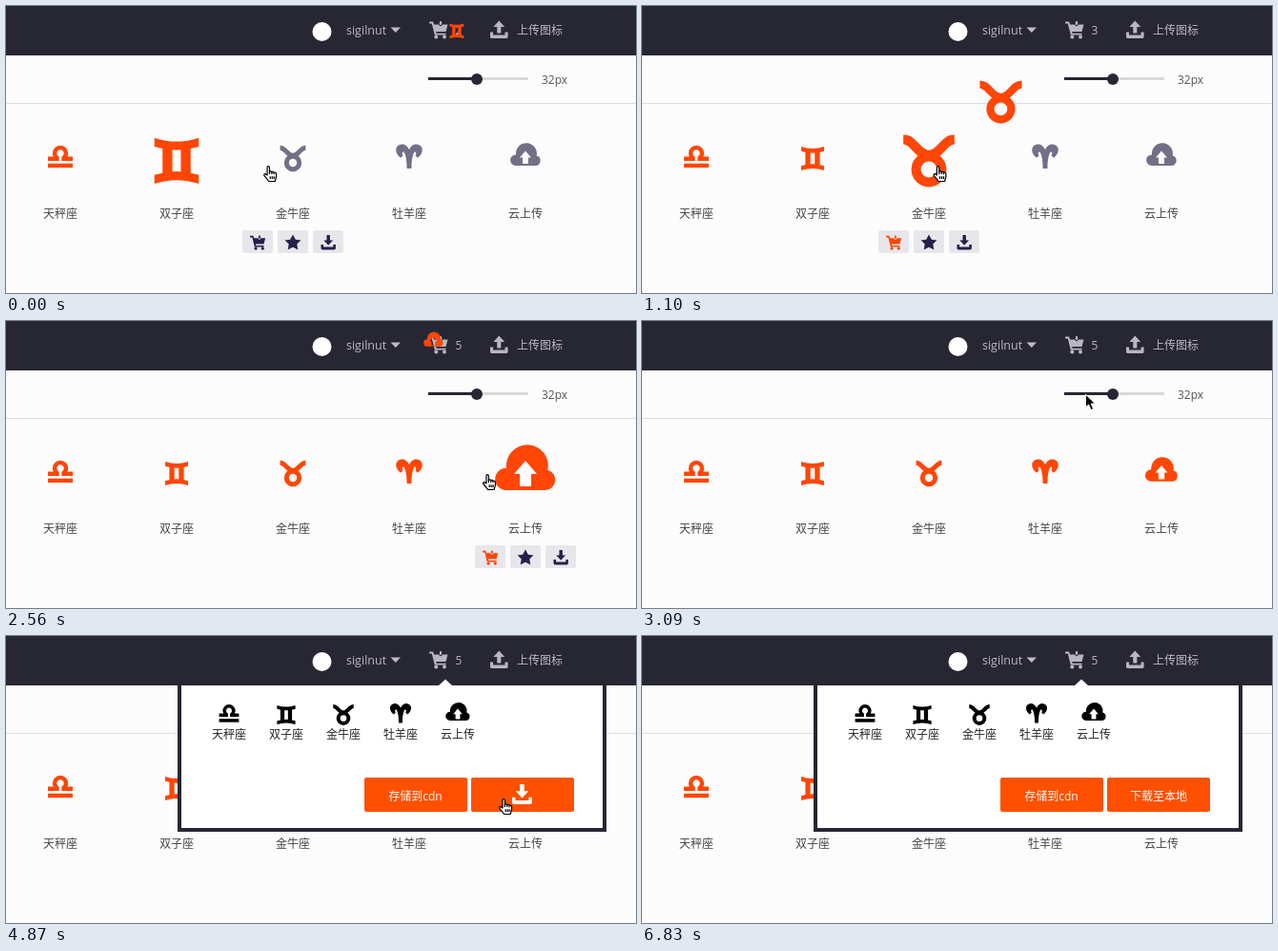
Animation of 661x302 px, one loop 7.22 s. Source, as an HTML page:

```html
<!DOCTYPE html>
<html lang="zh">
<head>
<meta charset="utf-8">
<title>图标购物车</title>
<style>
html, body { margin: 0; width: 100%; height: 100%; overflow: hidden; background: #fcfcfc; }
svg { display: block; width: 661px; height: 302px; }
text { font: 12px "Open Sans", "Noto Sans", "Noto Sans CJK SC", "Noto Sans CJK", sans-serif; }
.mid { text-anchor: middle; }
</style>
</head>
<body>
<svg id="stage" viewBox="0 0 661 302">
  <defs>
    <g id="libra">
      <path d="M-13 2.8H-3.6V1.8A6 6 0 1 1 3.6 1.8V2.8H13" fill="none" stroke="currentColor" stroke-width="4.5"/>
      <path d="M-13 7.7H13V12.1H-13Z" fill="currentColor"/>
    </g>
    <g id="gemini" fill="currentColor">
      <path d="M-12 -10Q0 -6 12 -10V-5.2Q0 -1.4 -12 -5.2Z"/>
      <path d="M-12 15Q0 11 12 15V10.2Q0 6.4 -12 10.2Z"/>
      <path d="M-7.6 -6H-2.3V11H-7.6ZM2.3 -6H7.6V11H2.3Z"/>
    </g>
    <g id="taurus" fill="none" stroke="currentColor" stroke-width="5">
      <circle cy="7" r="6.7"/>
      <path d="M-13.4 -8.7C-7.4 -8.7 -6.6 -1 0 -.5C6.6 -1 7.4 -8.7 13.4 -8.7"/>
    </g>
    <g id="aries" fill="currentColor">
      <path id="horn" d="M.1 13H-2.4C-2.5 6 -3 0 -5.3 -4.3C-7.3 -5.2 -8 -2.6 -6.5 -.6L-9 1.8C-13 -1 -15 -6 -13 -9.4C-10.6 -13.8 -3 -14.4 .1 -6.5Z"/>
      <use href="#horn" transform="scale(-1 1)"/>
    </g>
    <path id="cloud" fill="currentColor" fill-rule="evenodd" d="M-10.2 10A5.8 5.8 0 0 1 -10 -1.6A11 11 0 1 1 11.7 -.6A5.4 5.4 0 0 1 10.4 10ZM0 -5.5L6 1.5H3V8H-3V1.5H-6Z"/>
    <g id="cart" fill="currentColor">
      <path d="M0 1H4.2L5 4H9.6L12 6L14.4 4H19.5L17.5 11.5H7.2L7.6 13.2H17.5V15H5.8L2.8 3H0Z"/>
      <path d="M11 .6H13V3H14L12 4.8L10 3H11Z"/>
      <circle cx="7.3" cy="17" r="2"/><circle cx="16" cy="17" r="2"/>
    </g>
    <path id="tray" fill="currentColor" d="M0 13H3.3V16.2H16.7V13H20V18Q20 20 18 20H2Q0 20 0 18Z"/>
    <g id="down" fill="currentColor"><use href="#tray"/><path d="M7.8 0H12.2V7H16.4L10 13.8L3.6 7H7.8Z"/></g>
    <g id="up" fill="currentColor"><use href="#tray"/><path d="M7.8 14H12.2V7H16.4L10 0L3.6 7H7.8Z"/></g>
    <path id="star" fill="currentColor" d="M0 -8.5L2.8 -3.2L8.4 -2.6L4.3 1.5L5.3 7.4L0 4.7L-5.3 7.4L-4.3 1.5L-8.4 -2.6L-2.8 -3.2Z"/>
    <path id="arrow" fill="#000" stroke="#fff" stroke-width="1" d="M.5 .5V14L3.6 11.2L6 16.8L8.6 15.7L6.2 10.2H10.5Z"/>
    <g id="hand" stroke="#000" stroke-width="1.2" stroke-linejoin="round">
      <path fill="#fff" d="M4 10V2Q4 .6 5.2 .6T6.4 2V6.3Q7.6 5.2 8.7 6.6Q10 5.8 11 7.2Q13.5 6.8 13.5 9V11.5L12.2 16.5H5.6Q3.6 13.5 .8 10.3Q.4 8.4 2.2 8.7Z"/>
      <path fill="none" d="M6.4 6V9M8.8 6.8V9M11 7.4V9.3M7.2 11.3V14M9.2 11.3V14M11.1 11.3V14"/>
    </g>
  </defs>

  <path fill="#fcfcfc" d="M0 0H661V302H0Z"/>
  <path fill="#ddd" d="M0 102H661V103H0Z"/>
  <path fill="#272633" d="M0 0H661V52H0Z"/>
  <circle cx="331.5" cy="27" r="10" fill="#fff"/>
  <g fill="#bcbbc6" color="#b7b6c1">
    <text x="357" y="29.5" style="font-size:12.5px">sigilnut</text>
    <path d="M403.5 22.5H414L408.8 28Z"/>
    <use href="#cart" transform="translate(444 15.5)"/>
    <text id="count" x="471.5" y="30"></text>
    <use href="#up" transform="translate(508 15.5) scale(.93)"/>
    <text x="536" y="30">上传图标</text>
  </g>
  <path fill="#d9d9d9" d="M494 75H548V78H494Z"/>
  <path fill="#272633" d="M443 75H494V78H443Z"/>
  <circle cx="494" cy="77" r="6" fill="#272633"/>
  <text x="562" y="81.5" fill="#555">32px</text>

  <g id="items"></g>
  <g id="tools" color="#23214a">
    <g fill="#e7e7eb">
      <rect x="-53" y="236" width="32" height="24" rx="2"/>
      <rect x="-16" y="236" width="32" height="24" rx="2"/>
      <rect x="21" y="236" width="32" height="24" rx="2"/>
    </g>
    <use id="toolCart" href="#cart" transform="translate(-45 241) scale(.83)"/>
    <use href="#star" y="249"/>
    <use href="#down" transform="translate(29.5 241) scale(.77)"/>
  </g>
  <g id="flights" color="#ff4606"></g>

  <g id="popup">
    <path fill="#272633" d="M180 51H630V206H180Z"/>
    <path fill="#fff" d="M184 52H454L461 45.5L468 52H626V202H184Z"/>
    <g id="picked" color="#000"></g>
    <g fill="#ff5000">
      <rect x="376" y="149" width="108" height="36" rx="2"/>
      <rect x="488" y="149" width="108" height="36" rx="2"/>
    </g>
    <g fill="#fff" color="#fff">
      <text class="mid" x="429.5" y="172.5">存储到cdn</text>
      <text class="mid" id="saveText" x="542" y="172.5">下载至本地</text>
      <use id="saveIcon" href="#down" transform="translate(531 156) scale(1.05)"/>
    </g>
  </g>
  <use id="cursor"/>
</svg>
<script>
const LOOP = 7220, FLIGHT = 1000, ZOOM = 400;
const $ = id => document.getElementById(id);

// on/off: pointer over the item; click: added to the cart; end: landing point
const items = [
  { id: 'libra', name: '天秤座', on: -9e3, off: -9e3, click: -9e3 },
  { id: 'gemini', name: '双子座', on: -2000, off: -30, click: -830, end: [478, 22.5] },
  { id: 'taurus', name: '金牛座', on: 20, off: 1180, click: 815, end: [456.5, 32] },
  { id: 'aries', name: '牡羊座', on: 1180, off: 1730, click: 1315, end: [450, 22] },
  { id: 'cloud', name: '云上传', on: 1730, off: 2820, click: 1760, end: [446, 17] }
];

// time, left, top
const path = [
  [0, 270, 168], [450, 305, 170], [1100, 305, 168], [1200, 345, 166], [1300, 412, 164],
  [1680, 432, 164], [1800, 515, 166], [2050, 522, 166], [2400, 508, 164], [2560, 500, 161],
  [2900, 484, 150], [3060, 470, 90], [3210, 446, 26], [3690, 446, 26], [3810, 458, 40],
  [4390, 515, 177], [4570, 515, 174], [4810, 516, 172], [4870, 517, 171],
  [6430, 517, 171], [6830, 640, 305], [LOOP, 640, 305]
];

const clamp = v => Math.max(0, Math.min(1, v));
const mix = (a, b, p) => a + (b - a) * p;
const bez = (a, b, u) => 3 * a * u * (1 - u) ** 2 + 3 * b * u * u * (1 - u) + u ** 3;

// cubic-bezier(.25, .1, .25, 1)
function ease(v) {
  const x = clamp(v);
  let lo = 0, hi = 1;
  for (let i = 0; i < 18; i++) {
    const m = (lo + hi) / 2;
    if (bez(.25, .25, m) < x) lo = m; else hi = m;
  }
  return x === 0 || x === 1 ? x : bez(.1, 1, lo);
}

function add(parent, tag, attrs, text) {
  const el = document.createElementNS('http://www.w3.org/2000/svg', tag);
  for (const k in attrs) el.setAttribute(k, attrs[k]);
  if (text) el.textContent = text;
  return $(parent).appendChild(el);
}

const place = (el, x, y, s = 1) => el.setAttribute('transform', `translate(${x} ${y}) scale(${s})`);
const show = (el, on) => el.setAttribute('visibility', on ? 'visible' : 'hidden');

items.forEach((it, i) => {
  it.x = 57 + 122 * i;
  const href = '#' + it.id, px = 234 + 60 * i;
  it.icon = add('items', 'use', { href });
  add('items', 'text', { x: it.x, y: 222.5, class: 'mid', fill: '#444' }, it.name);
  it.flyer = add('flights', 'use', { href });
  place(add('picked', 'use', { href }), px, 81, .8);
  add('picked', 'text', { x: px, y: 107.5, class: 'mid', fill: '#222' }, it.name);
});

function pointer(t) {
  const i = path.findIndex(k => k[0] > t), a = path[i - 1], b = path[i];
  const p = (t - a[0]) / (b[0] - a[0]);
  return [mix(a[1], b[1], p), mix(a[2], b[2], p)];
}

function draw(t) {
  for (const it of items) {
    const zoom = 1 + ease((t - it.on) / ZOOM) - ease((t - it.off) / ZOOM);
    place(it.icon, it.x, 158, zoom);
    it.icon.setAttribute('color', t >= it.click ? '#ff4606' : '#717086');
    const flying = t >= it.click && t < it.click + FLIGHT;
    show(it.flyer, flying);
    if (flying) {
      const p = ease((t - it.click) / FLIGHT);
      place(it.flyer, mix(it.x, it.end[0], p), mix(158, it.end[1], p), 2 - 1.42 * p ** 1.9);
    }
  }
  $('count').textContent = items.filter(it => t >= it.click).length;

  // the first hover is already under way when the loop starts
  const over = items.find(it => t >= it.on - 20 && t < it.off);
  $('tools').setAttribute('display', over ? 'inline' : 'none');
  if (over) {
    place($('tools'), over.x, 0);
    $('toolCart').setAttribute('color', t >= over.click ? '#ff4606' : '#23214a');
  }

  const [x, y] = pointer(t);
  const open = t >= 3390;
  const onSave = open && x > 483 && x < 591 && y > 149 && y < 185;
  $('popup').setAttribute('display', open ? 'inline' : 'none');
  $('saveText').setAttribute('display', onSave ? 'none' : 'inline');
  $('saveIcon').setAttribute('display', onSave ? 'inline' : 'none');

  const hand = onSave || t < 2850 || (t > 3150 && t < 3700);
  $('cursor').setAttribute('href', hand ? '#hand' : '#arrow');
  place($('cursor'), x, y);
  show($('cursor'), t < 6820);
}

const start = performance.now();
function tick() {
  draw((performance.now() - start) % LOOP);
  requestAnimationFrame(tick);
}
tick();
</script>
</body>
</html>
```
